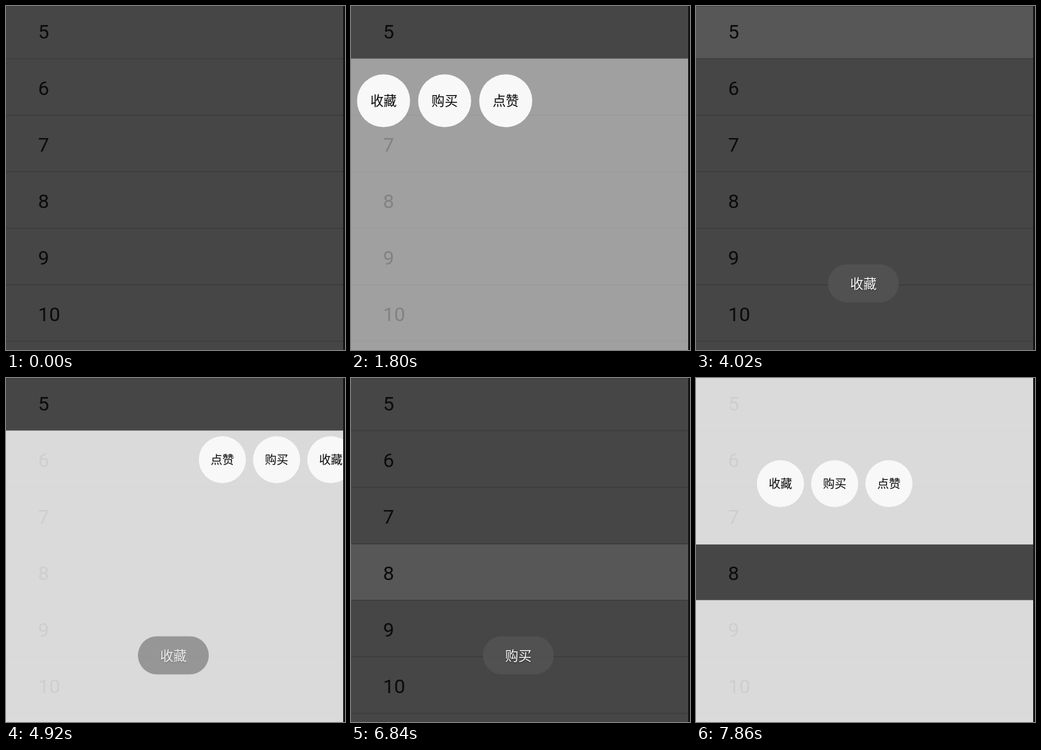
These frames come from a looping animation (550x560 px, 8 s). An HTML page:

```html
<!DOCTYPE html>
<html lang="zh">
<head>
<meta charset="utf-8">
<style>
  html, body { margin: 0; width: 100%; height: 100%; overflow: hidden; background: #131313; }
  svg { display: block; width: 550px; height: 560px; }
  .num { font: 32px Roboto, sans-serif; fill: #0b0b0b; }
  .cjk { font-family: "Noto Sans CJK SC", "Noto Sans CJK", sans-serif; text-anchor: middle; }
  #toast text { font-size: 21.6px; fill: #f8f8f8; text-shadow: 0 1px 2px rgba(0, 0, 0, .6); }
</style>
</head>
<body>
<svg viewBox="0 0 550 560">
  <clipPath id="screen"><rect width="547" height="560"/></clipPath>
  <rect width="550" height="560" fill="#131313"/>
  <g clip-path="url(#screen)">
    <rect width="547" height="560" fill="#464646"/>
    <rect id="press" width="547" fill="#575757"/>
    <g id="list"><rect width="547" height="1" fill="#3f3f3f"/></g>
    <path id="scrim" fill="#fff" fill-rule="evenodd"/>
    <g id="menu"></g>
    <g id="toast">
      <rect x="214" y="420.5" width="115" height="62" rx="31" fill="#545454" fill-opacity=".83"/>
      <text class="cjk" x="271.5" y="460"></text>
    </g>
  </g>
</svg>
<script>
const LOOP = 8000, STEP = 60, ENTER = 500, EXIT = 250, SCRIM = 0.8;
const GAP = 88, RADIUS = 38.2;
const LABELS = ["收藏", "购买", "点赞"];

// x, y: first button at rest; py: scaling centre; dir: side the others lie on
const MENUS = [
  { press: 1440, open: 1495, close: 2920, x: 52.8, y: 146.7, py: 86.7, dir: 1, top: 0, bottom: 85.5 },
  { press: 4020, open: 4075, close: 5680, x: 527, y: 133, py: 55, dir: -1, top: 0, bottom: 85.5 },
  { press: 6840, open: 6895, close: Infinity, x: 137, y: 172, py: 290, dir: 1, top: 271, bottom: 361.5 }
];
const TOASTS = [
  { text: LABELS[0], show: 2700, hide: 4620 },
  { text: LABELS[1], show: 5400, hide: 7360 }
];

const $ = id => document.getElementById(id);
const clamp = v => Math.max(0, Math.min(1, v));
const overshoot = p => (p - 1) ** 2 * (3 * (p - 1) + 2) + 1;
const anticipate = p => p * p * (3 * p - 2);

function add(parent, tag, attrs, text = "") {
  const el = document.createElementNS("http://www.w3.org/2000/svg", tag);
  for (const key in attrs) el.setAttribute(key, attrs[key]);
  el.textContent = text;
  return parent.appendChild(el);
}

for (let i = 0; i < 6; i++) {
  add($("list"), "text", { class: "num", x: 52, y: 53 + 92 * i }, i + 5);
  add($("list"), "rect", { y: 85 + 92 * i, width: 547, height: 1.5, fill: "#3b3b3b" });
}

const buttons = LABELS.map(label => {
  const g = add($("menu"), "g", {});
  add(g, "circle", { r: RADIUS, fill: "#f8f8f8" });
  add(g, "text", { class: "cjk", y: 7.2, "font-size": 19, fill: "#080808" }, label);
  return g;
});

function drawMenu(t) {
  const m = MENUS.findLast(m => t >= m.press) || MENUS[0];
  const inP = clamp((t - m.open) / ENTER);
  const outP = clamp((t - m.close) / EXIT);
  const scale = outP > 0 ? 1 - anticipate(outP) : overshoot(inP);
  const pressed = t < m.press ? 0 : 1 - clamp((t - m.open) / 100);

  $("press").setAttribute("y", m.top);
  $("press").setAttribute("height", m.bottom - m.top);
  $("press").setAttribute("opacity", pressed);
  $("scrim").setAttribute("d", `M0 0H547V560H0ZM0 ${m.top}H547V${m.bottom}H0Z`);
  $("scrim").setAttribute("opacity", SCRIM * inP * (1 - outP));

  const visible = inP > 0 && outP < 1;
  $("menu").setAttribute("display", visible ? "inline" : "none");
  buttons.forEach((b, i) => {
    const x = m.x + m.dir * GAP * i * scale;
    const y = m.py + (m.y - m.py) * scale;
    b.setAttribute("transform", `translate(${x} ${y}) scale(${scale})`);
  });
}

function drawToast(t) {
  const toast = TOASTS.findLast(s => t >= s.show);
  let opacity = 0;
  if (toast) {
    const inP = clamp((t - toast.show) / 500);
    const outP = clamp((t - toast.hide) / 480);
    opacity = (1 - (1 - inP) ** 2) * (1 - outP ** 2);
    $("toast").lastElementChild.textContent = toast.text;
  }
  $("toast").setAttribute("opacity", opacity);
}

function draw(now) {
  const t = Math.floor((now % LOOP) / STEP) * STEP;
  drawMenu(t);
  drawToast(t);
}

const start = performance.now();
function tick() {
  draw(performance.now() - start);
  requestAnimationFrame(tick);
}
tick();
</script>
</body>
</html>
```
